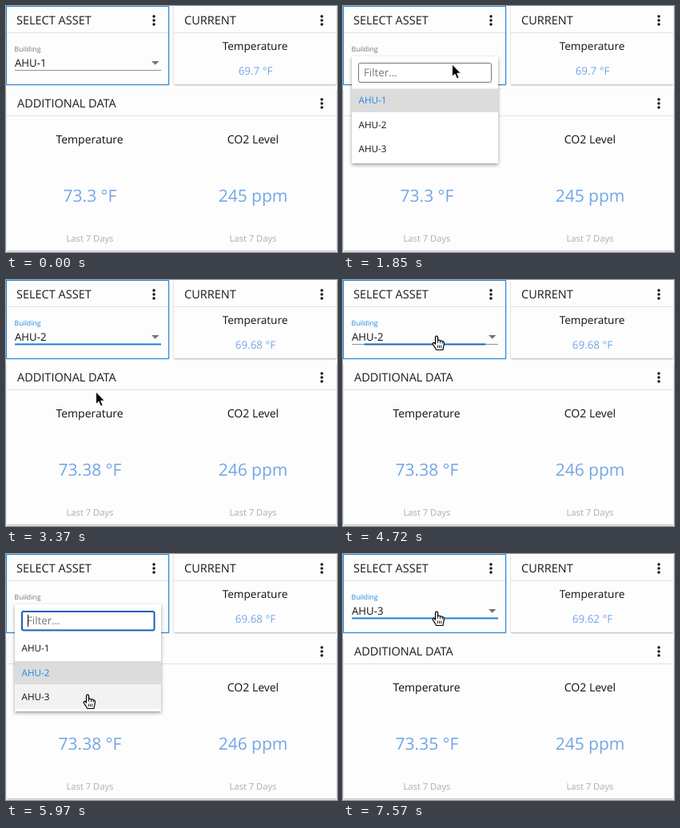
An HTML page that plays this animation: 414x308 px, repeating every 8000 ms.

```html
<!DOCTYPE html>
<html lang="en">
<head>
<meta charset="utf-8">
<title>Asset dashboard</title>
<style>
html, body { margin: 0; width: 100%; height: 100%; overflow: hidden; background: #fff; }
svg { display: block; width: 414px; height: 308px; font-family: "Open Sans", sans-serif; text-rendering: geometricPrecision; }

.card { fill: #fdfdfd; filter: drop-shadow(0 1px 1px rgba(0, 0, 0, .32)); }
.active { fill: none; stroke: #1e88e5; }
.rule { stroke: #e4e4e4; }
.head { font-size: 14.5px; fill: #1a1a1a; }
.name { font-size: 14px; fill: #111; text-anchor: middle; }
.name.small { font-size: 13.6px; }
.big { font-size: 21px; fill: #73a6e6; text-anchor: middle; }
.now { font-size: 13.4px; fill: #73a6e6; text-anchor: middle; }
.note { font-size: 11.2px; fill: #adadad; text-anchor: middle; }
.value { font-size: 13.2px; fill: #111; }
.opt { font-size: 11.7px; fill: #111; }
.opt.on { fill: #1e88e5; }
.hint { font-size: 13.3px; fill: #757575; }
.sheet { fill: #fff; filter: drop-shadow(0 2px 2px rgba(0, 0, 0, .38)); }
.picked { fill: #dcdcdc; }
.hover { fill: #f2f2f2; }
.box { fill: #fff; stroke: #767676; }
.box.focus { stroke: #175fc0; stroke-width: 2; }

.label, .bar, .cursor, .panel { animation: 8s linear infinite; }
.one, .two, .three, .hover, .hand, .arrow, .caret { animation: 8s step-end infinite; }

/* asset data sets */
.one { animation-name: one; }
.two { animation-name: two; }
.three { animation-name: three; }
@keyframes one { 0% { visibility: visible } 41.125%, 100% { visibility: hidden } }
@keyframes two { 0% { visibility: hidden } 41.125% { visibility: visible } 82.375%, 100% { visibility: hidden } }
@keyframes three { 0% { visibility: hidden } 82.375%, 100% { visibility: visible } }

/* select field focus */
.label { font-size: 8.7px; animation-name: label; }
@keyframes label {
  0%, 16.49% { fill: #757575 }
  16.5%, 18% { fill: #1e88e5 }
  20%, 39% { fill: #757575 }
  40.5%, 60.125% { fill: #1e88e5 }
  61.5%, 80.2% { fill: #757575 }
  82%, 100% { fill: #1e88e5 }
}
.bar { transform-origin: 102.5px 80px; animation-name: bar; }
@keyframes bar {
  0%, 16.49% { transform: scaleX(0); fill: #1c4468 }
  16.5%, 17.625% { transform: scaleX(.754); fill: #1c4468 }
  18.75%, 19% { transform: scaleX(1); fill: #1e7fd2 }
  21%, 39% { transform: scaleX(0); fill: #1e7fd2 }
  40.5%, 58.99% { transform: scaleX(1); fill: #1e7fd2 }
  59%, 60.125% { transform: scaleX(.83); fill: #1a68b4 }
  61.25%, 80.2% { transform: scaleX(0); fill: #1e7fd2 }
  82%, 100% { transform: scaleX(1); fill: #1e7fd2 }
}

/* dropdowns */
.panel { transform-origin: 102px 63px; }
.first { animation-name: first; }
.second { animation-name: second; }
@keyframes first {
  0%, 17.625% { opacity: 0; transform: scaleY(.8) }
  20%, 38.875% { opacity: 1; transform: none }
  41.125%, 100% { opacity: 0; transform: none }
}
@keyframes second {
  0%, 60.125% { opacity: 0; transform: scaleY(.8) }
  61.25%, 80.125% { opacity: 1; transform: none }
  82.375%, 100% { opacity: 0; transform: none }
}
.h1 { animation-name: h1; }
.h2 { animation-name: h2; }
.h3 { animation-name: h3; }
@keyframes h1 { 0% { visibility: hidden } 67.7% { visibility: visible } 69.6%, 100% { visibility: hidden } }
@keyframes h2 { 0% { visibility: hidden } 34.7%, 100% { visibility: visible } }
@keyframes h3 { 0% { visibility: hidden } 72.1%, 100% { visibility: visible } }
.caret { stroke: #111; animation-name: caret; }
@keyframes caret { 0% { opacity: 1 } 64.625% { opacity: 0 } 71.25% { opacity: 1 } 77.875%, 100% { opacity: 0 } }

/* pointer */
.cursor { animation-name: move; animation-timing-function: ease-in-out; }
@keyframes move {
  0%, 4.5% { transform: translate(170px, -24px) }
  14.625%, 27.625% { transform: translate(136px, 73px) }
  36.625%, 45.5% { transform: translate(112px, 140px) }
  51.125%, 63.4% { transform: translate(117px, 70px) }
  74.625%, 80.125% { transform: translate(102px, 176px) }
  84.5%, 85.625% { transform: translate(100px, 170px) }
  94.625%, 100% { transform: translate(117px, 72px) }
}
.hand { animation-name: hand; }
.arrow { animation-name: arrow; }
@keyframes hand {
  0%, 41.125%, 61.25%, 81.25% { opacity: 0 }
  31.9%, 49%, 67.7%, 92.5%, 100% { opacity: 1 }
}
@keyframes arrow {
  0%, 41.125%, 61.25%, 81.25% { opacity: 1 }
  31.9%, 49%, 67.7%, 92.5%, 100% { opacity: 0 }
}
</style>
</head>
<body>
<svg viewBox="0 0 414 308">
  <defs>
    <g id="dots" fill="#111">
      <circle cy="-5" r="1.75"/><circle r="1.75"/><circle cy="5" r="1.75"/>
    </g>
  </defs>

  <!-- cards -->
  <rect class="card" x="0" y="0" width="204" height="98"/>
  <rect class="card" x="210" y="0" width="203" height="98"/>
  <rect class="card" x="1" y="104" width="412" height="202"/>
  <path class="rule" d="M1 33.5H203M210 33.5H413M1 137.5H413"/>
  <rect class="active" x=".5" y=".5" width="203" height="98"/>
  <text class="head" x="13" y="23">SELECT ASSET</text>
  <text class="head" x="223" y="23">CURRENT</text>
  <text class="head" x="14" y="127">ADDITIONAL DATA</text>
  <use href="#dots" x="185" y="18"/>
  <use href="#dots" x="395" y="18"/>
  <use href="#dots" x="395" y="122"/>

  <!-- select field -->
  <text class="label" x="10.5" y="57">Building</text>
  <g class="value">
    <text class="one" x="11" y="76">AHU-1</text>
    <text class="two" x="11" y="76">AHU-2</text>
    <text class="three" x="11" y="76">AHU-3</text>
  </g>
  <path d="M182 69h9.500l-4.750 4.800z" fill="#757575"/>
  <path d="M11 80.500H194" stroke="#949494"/>
  <rect class="bar" x="11" y="79.500" width="183" height="2"/>

  <!-- readings -->
  <text class="name small" x="311.500" y="55">Temperature</text>
  <g class="now">
    <text class="one" x="312" y="86">69.7 °F</text>
    <text class="two" x="312" y="86">69.68 °F</text>
    <text class="three" x="312" y="86">69.62 °F</text>
  </g>
  <text class="name" x="104.500" y="172">Temperature</text>
  <text class="name" x="309" y="172">CO2 Level</text>
  <g class="big">
    <text class="one" x="105" y="245">73.3 °F</text>
    <text class="two" x="105" y="245">73.38 °F</text>
    <text class="three" x="105" y="245">73.35 °F</text>
    <text class="one" x="309" y="245">245 ppm</text>
    <text class="two" x="309" y="245">246 ppm</text>
    <text class="three" x="309" y="245">245 ppm</text>
  </g>
  <text class="note" x="105" y="295">Last 7 Days</text>
  <text class="note" x="309" y="295">Last 7 Days</text>

  <!-- dropdowns -->
  <g class="panel first">
    <rect class="sheet" x="11" y="63" width="183" height="134"/>
    <rect class="box" x="19.500" y="71.500" width="166" height="24" rx="2"/>
    <text class="hint" x="26" y="88">Filter...</text>
    <rect class="picked" x="11" y="103.500" width="183" height="29.500"/>
    <rect class="hover h2" x="11" y="134" width="183" height="29.500"/>
    <text class="opt on" x="19.500" y="122">AHU-1</text>
    <text class="opt" x="19.500" y="153">AHU-2</text>
    <text class="opt" x="19.500" y="183">AHU-3</text>
  </g>
  <g class="panel second">
    <rect class="sheet" x="11" y="63" width="183" height="134"/>
    <rect class="box focus" x="20" y="72" width="165.500" height="23.500" rx="2"/>
    <text class="hint" x="26" y="88">Filter...</text>
    <path class="caret" d="M27.500 76V91"/>
    <rect class="hover h1" x="11" y="103.500" width="183" height="29.500"/>
    <rect class="picked" x="11" y="134" width="183" height="29.500"/>
    <rect class="hover h3" x="11" y="164.500" width="183" height="29.500"/>
    <text class="opt" x="19.500" y="122">AHU-1</text>
    <text class="opt on" x="19.500" y="153">AHU-2</text>
    <text class="opt" x="19.500" y="183">AHU-3</text>
  </g>

  <!-- pointer -->
  <g class="cursor" stroke-linejoin="round">
    <path class="arrow" d="M.5 0V15.500L4 12.200L6.500 18L9.200 16.900L6.700 11.200H11.500Z" fill="#000" stroke="#fff"/>
    <g class="hand">
      <path d="M-1.500 2C-1.500-.5 1.500-.5 1.600 2V6C2.200 4.800 4.300 5 4.500 6.400C5.300 5.500 7 5.900 7.200 7.200C8.200 6.600 9.400 7.300 9.400 8.600C9.400 12 8.500 13.500 8 17.500H-.5C-1 15-3.800 12.500-4.800 10.200C-5.300 8.600-3.400 7.800-2.300 9.300L-1.500 10.300Z" fill="#fff" stroke="#000" stroke-width="1.200"/>
      <path d="M1.600 6V9M4.500 6.500V9.300M7.200 7.300V9.600M1.300 11.500V15M3.500 11.500V15M5.700 11.500V15" stroke="#000" stroke-width=".9"/>
    </g>
  </g>
</svg>
</body>
</html>
```
